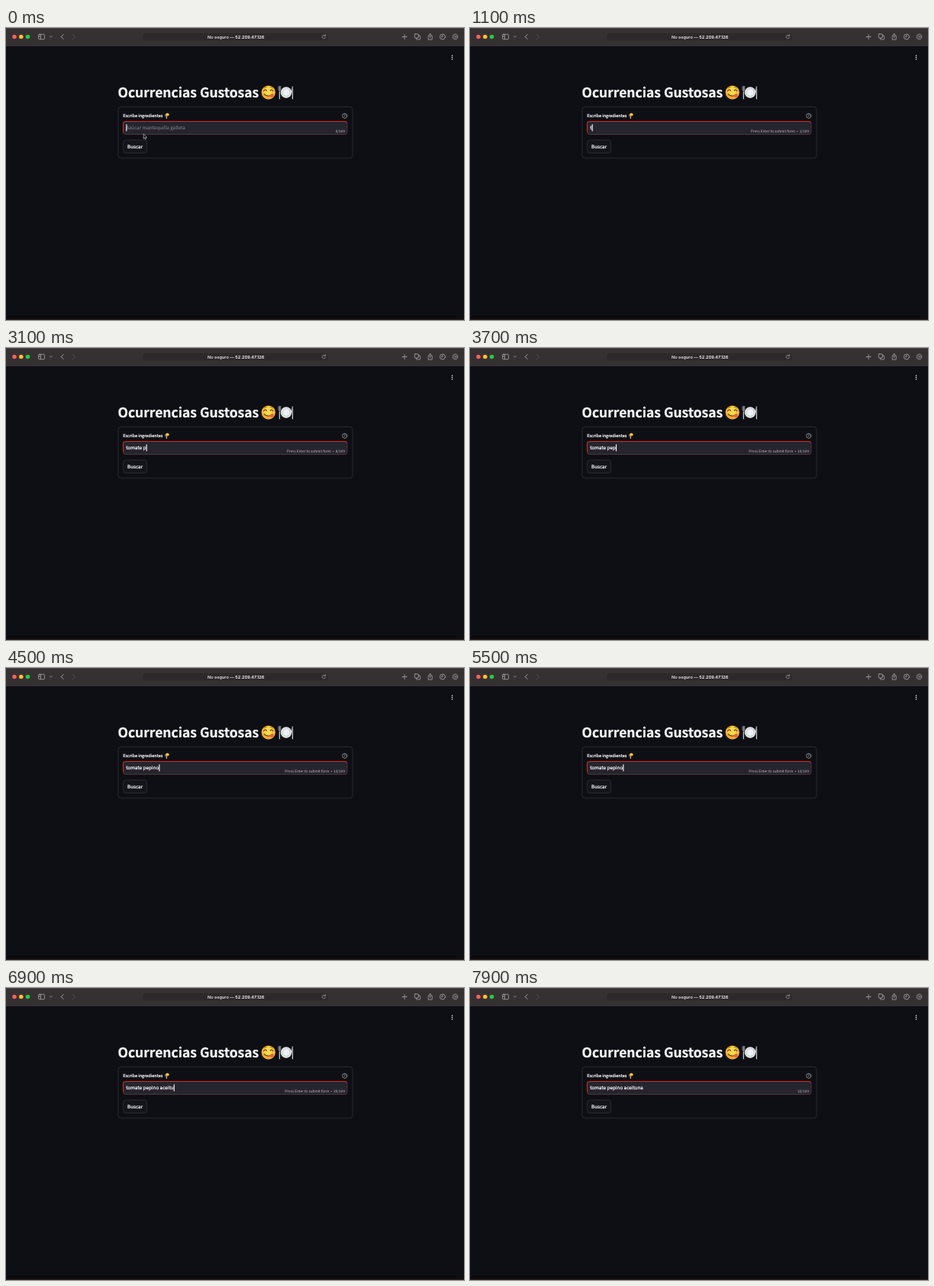
An HTML page that plays this animation: 600x383 px, repeating every 8 s.

```html
<!DOCTYPE html>
<html lang="es">
<head>
<meta charset="utf-8">
<title>Ocurrencias Gustosas</title>
<style>
html, body { margin: 0; width: 100%; height: 100%; overflow: hidden; background: #0e0f14; }
svg { display: block; width: 100vw; height: 100vh; }
text { font-family: "Noto Sans CJK JP", "Noto Sans CJK SC", "Noto Sans", sans-serif; fill: #fafafa; white-space: pre; text-rendering: geometricPrecision; }
.bar { font: 600 5.6px Inter, sans-serif; fill: #e4e2e3; }
.icon { fill: none; stroke: #aaa7a9; stroke-width: .8; stroke-linecap: round; stroke-linejoin: round; }
.frame { stroke: #36373e; stroke-width: .7; }
.strong { stroke: #fafafa; stroke-width: .24; }
</style>
</head>
<body>
<svg viewBox="0 0 600 383" preserveAspectRatio="none">
  <rect width="600" height="383" fill="#0e0f14"/>

  <!-- browser bar -->
  <rect width="600" height="24" fill="#353133"/>
  <rect width="600" height=".8" fill="#4f4845"/>
  <circle cx="11" cy="11.5" r="2.8" fill="#ff5f57"/>
  <circle cx="19.8" cy="11.5" r="2.8" fill="#febc2e"/>
  <circle cx="28.5" cy="11.5" r="2.8" fill="#28c840"/>
  <rect x="179" y="6" width="243" height="11" rx="2.5" fill="#2d292b" stroke="#413d3f" stroke-width=".5"/>
  <text class="bar" x="264" y="13.5">No seguro — <tspan fill="#fff">52.209.47.126</tspan></text>
  <g class="icon">
    <rect x="42.5" y="8.3" width="8" height="6.4" rx="1"/>
    <path d="M45.3 8.3v6.4M43.6 10h.6M43.6 11.5h.6"/>
    <path d="M57.8 11l1.2 1.2 1.2-1.2"/>
    <path d="M75 8.6l-2.8 2.9 2.8 2.9" stroke-width="1"/>
    <path d="M87.7 8.6l2.8 2.9-2.8 2.9" stroke="#5b5759"/>
    <path d="M418.2 10.1a2.3 2.3 0 1 0 .4 1.9M418.4 8.6v1.7h-1.7" stroke-width=".7"/>
    <path d="M519 11.5h6.2M522.1 8.4v6.2"/>
    <rect x="535.2" y="7.8" width="5.2" height="5.2" rx="1"/>
    <path d="M537.4 13v1.2a.8.8 0 0 0 .8.8h3.6a.8.8 0 0 0 .8-.8v-3.6a.8.8 0 0 0-.8-.8h-1.4"/>
    <path d="M554.4 10.3h-1.2v4.9h5v-4.9H557M555.7 12.3V7.6M554.2 9l1.5-1.5L557.2 9"/>
    <circle cx="572" cy="11.5" r="3.5"/><path d="M572 9.4v2.3h-1.6"/>
    <circle cx="588.5" cy="11.5" r="3.5" stroke-dasharray="1.2 .6" stroke-linecap="butt"/>
    <circle cx="588.5" cy="11.5" r="2.7" stroke-width=".5"/><circle cx="588.5" cy="11.5" r=".8" stroke-width=".6"/>
  </g>

  <!-- page -->
  <g fill="#f0f0f0">
    <circle cx="584.5" cy="36.2" r=".8"/><circle cx="584.5" cy="38.6" r=".8"/><circle cx="584.5" cy="41" r=".8"/>
  </g>
  <text class="strong" x="146.5" y="91.3" font-size="17.45" font-weight="700">Ocurrencias Gustosas</text>

  <!-- smiling face -->
  <radialGradient id="skin" cy=".4"><stop offset=".4" stop-color="#ffdc4a"/><stop offset="1" stop-color="#f5a623"/></radialGradient>
  <circle cx="343.8" cy="84.6" r="9.2" fill="url(#skin)"/>
  <g fill="none" stroke="#6b3d12" stroke-width="1.2" stroke-linecap="round">
    <path d="M337.6 82.6q1.8-2.6 3.8-.4M346 82.2q2-2.2 3.8.4M338.3 87q5.4 4.6 11 0"/>
    <path d="M338 78.6q1.4-1.4 3-1M346.4 77.6q1.8-.4 3 1" stroke-width=".7"/>
  </g>
  <path d="M344.6 89.2q2.2-1.6 4.2-2.2q2.8 1.2 1.4 3.3q-2.4 1.6-5.6-1.1z" fill="#ef5568"/>

  <!-- plate and cutlery -->
  <circle cx="367" cy="84.6" r="7.3" fill="#dcdfe3"/>
  <circle cx="367" cy="84.6" r="4.8" fill="#eef0f2" stroke="#b9bec5" stroke-width=".6"/>
  <g fill="none" stroke="#c3c8ce" stroke-linecap="round">
    <path d="M358.4 84v8.8M375.4 84.4v8.4" stroke-width="1.3"/>
    <path d="M357.2 76.6v5q1.2 2.6 2.4 0v-5M358.4 76.6v6" stroke-width=".7"/>
    <path d="M375.4 76.8q-1.7 3.4-1.3 7.4h1.3z" fill="#c3c8ce" stroke-width=".6"/>
  </g>

  <rect class="frame" x="147" y="103.3" width="307" height="67.4" rx="3.5" fill="none"/>
  <text class="strong" x="153.3" y="117.3" font-size="5.5">Escribe ingredientes</text>

  <!-- pointing hand -->
  <g fill="none" stroke="#fcc540" stroke-linecap="round">
    <path d="M210.3 113v5.3" stroke-width="1.3"/>
    <path d="M210.2 112.4h2.2M211.6 113.2v1.6M212.8 113v1.2" stroke-width="1.5"/>
    <path d="M209.4 113.2l-.8 1.8" stroke-width=".9"/>
  </g>
  <circle class="icon" cx="443.7" cy="115.2" r="3.1"/>
  <text x="443.7" y="117" font-size="4.6" text-anchor="middle">?</text>

  <rect x="153.5" y="122.5" width="293.5" height="17" rx="3" fill="#24252d" stroke="#6e4146" stroke-width=".7"/>
  <path d="M153.5 136.6v-11.1a3 3 0 0 1 3-3h287.5a3 3 0 0 1 2.6 1.5" fill="none" stroke="#d92a26"/>
  <text id="hint" x="157.4" y="133.3" font-size="6.28" style="fill:#8b8c93">Azúcar mantequilla galleta</text>
  <text id="typed" class="strong" x="157.2" y="133.3" font-size="6.28"></text>
  <rect id="caret" y="126.4" width="1.1" height="9" fill="#fff"/>
  <text id="count" x="444" y="137.3" font-size="4.7" text-anchor="end" style="fill:#c4c5ca"></text>

  <rect class="frame" x="153.6" y="147" width="31" height="17" rx="3" fill="#13151b"/>
  <text class="strong" x="169" y="157.9" font-size="6.28" text-anchor="middle">Buscar</text>

  <path id="mouse" d="M180.2 138.8v6.3l1.4-1.3 1 2.2.9-.4-.9-2.1h1.9z" fill="#000" stroke="#e8e8e8" stroke-width=".6"/>

  <!-- lower window edge -->
  <rect y="378.3" width="590" height="1.2" fill="#08080b"/>
  <rect y="382" width="600" height="1" fill="#2c201c"/>
</svg>
<script>
const LOOP = 8000, SENT = 7800;
const phrase = "tomate pepino aceituna";
const keys = [1000, 1400, 1900, 2050, 2200, 2400, 2600, 3000, 3500, 3700, 3850, 4000, 4200,
              5800, 6000, 6200, 6350, 6500, 6800, 6900, 7100, 7300];
const blinks = [[200, 700], [4800, 5300]];
const el = id => document.getElementById(id);
const [hint, typed, caret, count, mouse] = ["hint", "typed", "caret", "count", "mouse"].map(el);
const show = (node, on) => node.setAttribute("visibility", on ? "visible" : "hidden");

function draw(t) {
  const n = keys.filter(k => k <= t).length;
  typed.textContent = phrase.slice(0, n);
  count.textContent = (n && t < SENT ? "Press Enter to submit form  •  " : "") + n + "/100";
  caret.setAttribute("x", 157.3 + (n ? typed.getComputedTextLength() : 0));
  show(caret, t < SENT && !blinks.some(([a, b]) => t >= a && t < b));
  show(hint, !n);
  show(mouse, !n);
}

const start = performance.now();
function tick() {
  draw((performance.now() - start) % LOOP);
  requestAnimationFrame(tick);
}
tick();
</script>
</body>
</html>
```
